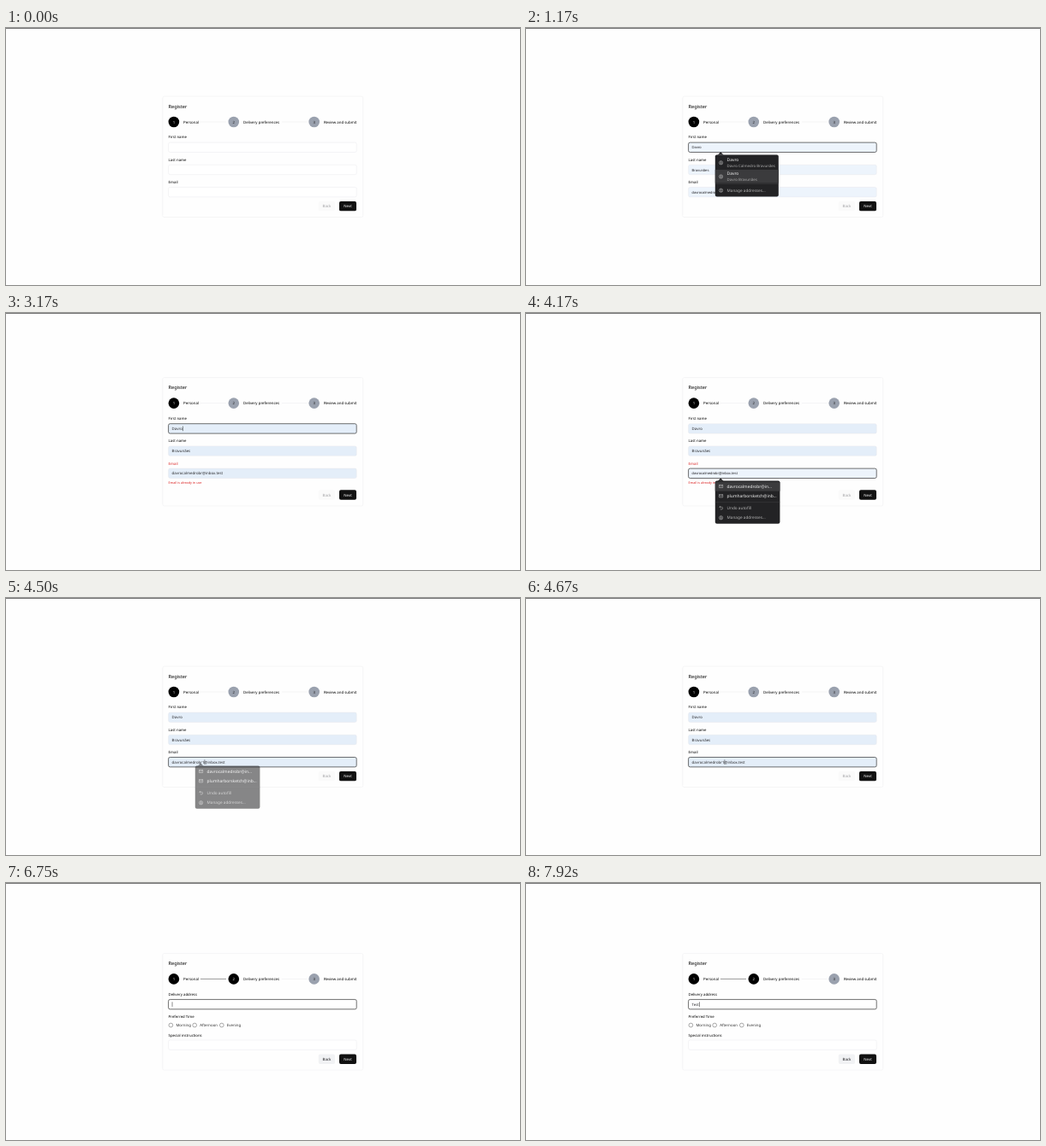
Recreate the animation shown at these times as an HTML page. Size 600 px wide and 301 px high, loop 8 s.

```html
<!DOCTYPE html>
<html lang="en">
<head>
<meta charset="utf-8">
<title>Register</title>
<style>
  html, body { margin: 0; width: 100%; height: 100%; overflow: hidden; background: #fefefe; }
  svg { display: block; width: 600px; height: 301px; font-family: "Noto Sans", sans-serif; }
  text { text-rendering: geometricPrecision; white-space: pre; }
  .preview { font-family: "Liberation Sans", Arial, sans-serif; font-size: 4.17px; }
  .icon { fill: none; stroke: #ccc; stroke-width: .5; }
</style>
</head>
<body>
<svg id="stage" viewBox="0 0 600 301"></svg>
<script>
const FIRST = 'Davro', LAST = 'Bravunães', USER = 'davrocalmedrobr', DOMAIN = '@inbox.test';
const INK = '#18181b', RED = '#dc2626', LOOP = 8000;

// y is the vertical centre of the text
const text = (x, y, str, size = 4.375, attrs = '') =>
  `<text x="${x}" y="${y + size * .35}" font-size="${size}" ${attrs}>${str}</text>`;
const label = (y, str, id = '') => text(189.6, y, str, 4.3, `id="${id}" font-weight="500"`);
const box = (x, y, w, h, r, attrs) =>
  `<rect x="${x}" y="${y}" width="${w}" height="${h}" rx="${r}" ${attrs}/>`;
const field = (id, y) =>
  box(189.6, y - 5.7, 219.6, 11.4, 1.9, `id="${id}" fill="#fff" stroke="#e4e4e7" stroke-width=".4"`) +
  text(193.6, y, '', 4.375, `id="${id}Text" fill="#27272a"`) +
  box(0, y - 2.8, .45, 5.6, 0, `id="${id}Caret"`);
const line = (x1, x2, id = '') =>
  `<path id="${id}" d="M${x1} 110H${x2}" stroke="#e8e8ea" stroke-width=".5"/>`;
const step = (n, x, name) =>
  `<circle id="dot${n}" cx="${x}" cy="110" r="6.3" fill="${n === 1 ? '#000' : '#9aa1ae'}"/>` +
  text(x, 110, n, 4.375, `id="num${n}" text-anchor="middle" fill="${n === 1 ? '#ddd' : '#27272a'}"`) +
  text(x + 11.2, 110, name, 4.375);
const radio = (x, name) =>
  `<circle cx="${x}" cy="166.5" r="2.35" fill="#fff" stroke="#444" stroke-width=".45"/>` +
  text(x + 6, 166.5, name, 4.375, 'fill="#333"');
const person = y => `<g class="icon"><circle cx="227.6" cy="${y}" r="2.1"/>
  <circle cx="227.6" cy="${y - .5}" r=".6"/><path d="M226.2 ${y + 1.5}q1.4 -1.6 2.8 0"/></g>`;
const mail = y => `<path class="icon" d="M225.5 ${y - 1.6}h4.2v3.2h-4.2zl2.1 1.8l2.1 -1.8"/>`;
const shell = (y, w, h) => `<path d="M223.8 ${y + .2}l3.4 -3.4l3.4 3.4z" fill="#232325"/>` +
  box(220.8, y, w, h, 2, 'fill="#232325"');
const row = (id, y, w, h) => box(220.8, y, w, h, 0, `id="${id}" fill="#3b3b3d"`);
const rule = (y, w) => `<path d="M220.8 ${y}h${w}" stroke="#48484a" stroke-width=".4"/>`;
const person2Lines = (y, full) => person(y + 3.4) +
  text(234.6, y, FIRST, 4.9, 'fill="#f4f4f4"') + text(234.6, y + 6.9, full, 4.4, 'fill="#aaa"');
const manage = y => person(y) + text(234.6, y, 'Manage addresses…', 4.7, 'fill="#b4b4b4"');

stage.innerHTML = `
  <path d="M0 .4H600" stroke="#444" stroke-width=".8"/>
  ${box(182.8, 80, 234, 141.6, 2, 'id="card" fill="#fefefe" stroke="#ececee" stroke-width=".5"')}
  <g id="head">
    ${text(189.6, 91.8, 'Register', 5.6, 'font-weight="500"')}
    ${line(227, 257, 'link')}${line(322, 351)}
    ${step(1, 195.9, 'Personal')}${step(2, 265.8, 'Delivery preferences')}${step(3, 359.7, 'Review and submit')}
  </g>
  <g id="personal">
    ${label(127.9, 'First name')}${field('first', 139.8)}
    ${label(154.2, 'Last name')}${field('last', 166)}
    ${label(180.5, 'Email', 'emailLabel')}${field('email', 192.2)}
    ${text(189.6, 203.4, 'Email is already in use', 3.75, `id="error" fill="${RED}"`)}
  </g>
  <g id="delivery">
    ${label(130.2, 'Delivery address')}${field('address', 142.1)}
    ${label(156.5, 'Preferred Time')}
    ${radio(192.4, 'Morning')}${radio(220.2, 'Afternoon')}${radio(251.8, 'Evening')}
    ${label(178, 'Special instructions')}${field('notes', 189.7)}
  </g>
  <g id="buttons">
    ${box(364.8, 202.9, 19.2, 11.4, 1.9, 'id="back"')}
    ${text(374.4, 208.6, 'Back', 4.375, 'id="backText" text-anchor="middle"')}
    ${box(389, 202.9, 20, 11.4, 1.9, 'id="next"')}
    ${text(399, 208.6, 'Next', 4.375, 'text-anchor="middle" fill="#fff"')}
  </g>
  <g id="namePopup">
    ${shell(148.4, 74, 49)}${row('name1', 150, 74, 15.8)}${row('name2', 166, 74, 15.6)}${rule(182.6, 74)}
    ${person2Lines(154.4, `${FIRST} Calmedro ${LAST}`)}${person2Lines(170.6, `${FIRST} ${LAST}`)}${manage(190.2)}
  </g>
  <g id="mailPopup">
    ${shell(196.6, 75.6, 50.2)}${row('mail1', 198, 75.6, 10.6)}${rule(221.6, 75.6)}
    ${mail(203)}${text(234.6, 203, 'davrocalmedrobr@in…', 4.9, 'fill="#f4f4f4"')}
    ${mail(214.3)}${text(234.6, 214.3, 'plumharborsketch@inb…', 4.9, 'fill="#f4f4f4"')}
    <path class="icon" d="M226 227.2h2.2a1.4 1.4 0 0 1 0 2.8h-1.4M227 226l-1.2 1.2l1.2 1.2"/>
    ${text(234.6, 228.4, 'Undo autofill', 4.7, 'fill="#b4b4b4"')}${manage(239.8)}
  </g>`;

const $ = id => document.getElementById(id);
const set = (id, attrs) => { for (const k in attrs) $(id).setAttribute(k, attrs[k]); };
const show = (id, visible) => set(id, { opacity: +visible });
const ramp = (t, start, length) => Math.min(1, Math.max(0, (t - start) / length));
const shade = v => `rgb(${v},${v},${v})`;

function drawField(id, value, { focus, preview, fill = '#fff', caretAt = -1 } = {}) {
  set(id, {
    fill: preview ? '#edf4fc' : fill,
    stroke: focus ? '#222' : '#e4e4e7',
    'stroke-width': focus ? .65 : .4
  });
  const node = $(id + 'Text');
  node.textContent = value;
  node.setAttribute('class', preview ? 'preview' : '');
  show(id + 'Caret', caretAt >= 0);
  if (caretAt >= 0) set(id + 'Caret', { x: 193.8 + (caretAt ? node.getSubStringLength(0, caretAt) : 0) });
}

function draw(t) {
  const during = (a, b) => t >= a && t < b;
  const invalid = during(1920, 4420), second = t >= 5750;
  const shift = invalid ? -4.4 : second ? 2.4 : 0;

  set('card', { y: 80 + shift, height: 141.6 - 2 * shift });
  for (const id of ['head', 'personal']) set(id, { transform: `translate(0 ${shift})` });
  set('buttons', { transform: `translate(0 ${-shift})` });
  show('personal', !second);
  show('delivery', second);

  set('dot2', { fill: second ? '#000' : '#9aa1ae' });
  set('num2', { fill: second ? '#ddd' : '#27272a' });
  set('link', { stroke: second ? '#333' : '#e8e8ea' });
  set('back', { fill: second ? '#f1f2f4' : '#fafafa' });
  set('backText', { fill: second ? INK : '#a0a0a3' });
  const hover = ramp(t, 5330, 150) - ramp(t, 6250, 250);
  set('next', { fill: shade(Math.round(17 + 28 * hover)) });

  // Personal step: values are previewed, then committed
  const filled = t >= 1000, preview = during(1000, 1920);
  const look = { preview, fill: filled ? '#e4eef9' : '#fff' };
  const nameCaret = during(420, 1000) ? 0 : during(1920, 2500) || during(3170, 3750) ? FIRST.length : -1;
  drawField('first', filled ? FIRST : '', { ...look, focus: during(420, 3920), caretAt: nameCaret });
  drawField('last', filled ? LAST : '', look);
  const typed = USER + (t >= 4420 ? '1' : '');
  drawField('email', filled ? typed + DOMAIN : '', {
    ...look, preview: preview || during(4170, 4420), focus: during(3920, 5500),
    caretAt: during(4420, 5000) ? typed.length : -1
  });
  set('emailLabel', { fill: invalid ? RED : '#000' });
  show('error', invalid);

  // Delivery step
  const letters = [7330, 7500, 7750, 7920].filter(at => t >= at).length;
  drawField('address', 'Test'.slice(0, letters), { focus: t >= 6750, caretAt: t >= 6750 ? letters : -1 });
  drawField('notes', '');

  set('namePopup', { opacity: ramp(t, 380, 120) * (t >= 420) * (1 - ramp(t, 1920, 180)) });
  show('name1', during(1000, 1080));
  show('name2', during(1080, 1920));
  set('mailPopup', { opacity: (t >= 3920) * (1 - ramp(t, 4420, 180)) });
  show('mail1', during(4170, 4420));
}

const start = performance.now();
function tick() {
  draw((performance.now() - start) % LOOP);
  requestAnimationFrame(tick);
}
tick();
</script>
</body>
</html>
```
